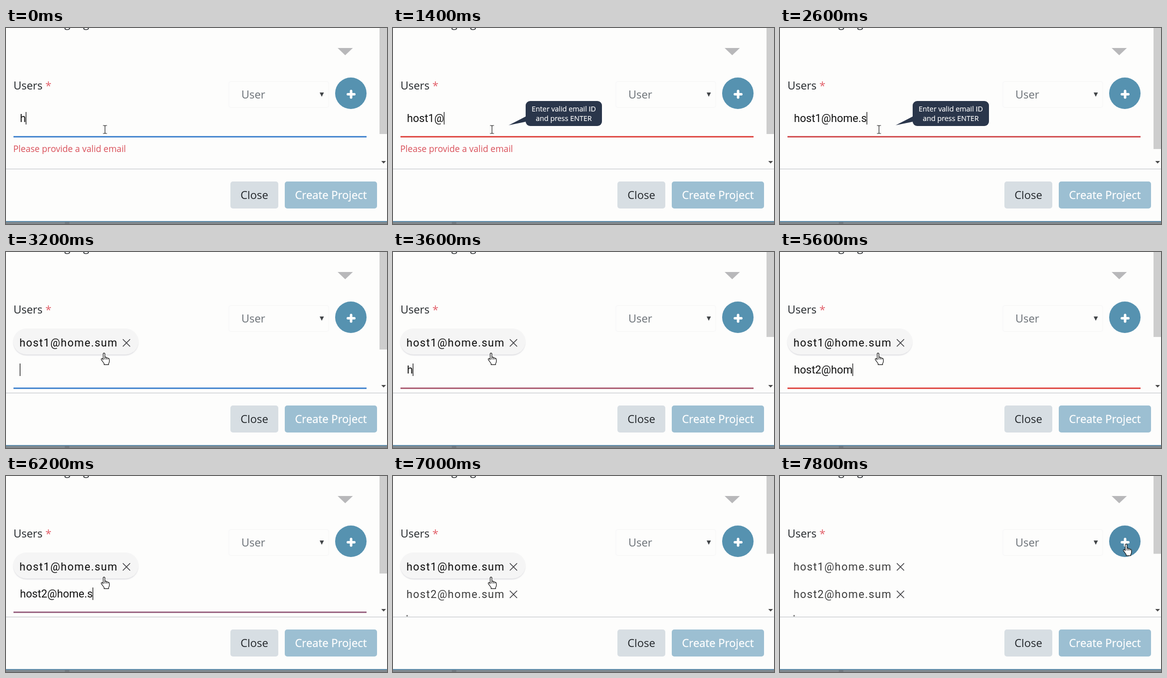
Recreate the animation shown at these times as an HTML page. Size 764x392 px, loop 8000 ms.

```html
<!DOCTYPE html>
<html lang="en">
<head>
<meta charset="utf-8">
<title>Add users</title>
<style>
  html, body { margin: 0; width: 100%; height: 100%; overflow: hidden; background: #fdfdfc; }
  svg { display: block; width: 100vw; height: 100vh; }
  text { font: 22px "Open Sans", sans-serif; fill: #212529; }
  .mono { font: 21.7px Roboto, sans-serif; fill: #111; }
  .chip .mono { letter-spacing: 1.45px; fill: #3c3c3c; }
  .chip.hover .mono { fill: #0c0c0c; }
  .chip .pill { visibility: hidden; }
  .chip.hover .pill { visibility: inherit; }
  .error { font-size: 17.6px; fill: #d9505a; }
  .tip text { font-size: 14.3px; fill: #fff; stroke: #fff; stroke-width: .2px; text-anchor: middle; }
  .button text { text-anchor: middle; }
</style>
</head>
<body>
<svg viewBox="0 0 764 392">
  <defs>
    <filter id="soft" x="-10%" y="-30%" width="120%" height="160%">
      <feGaussianBlur stdDeviation="1.3"/>
    </filter>
    <clipPath id="panel"><rect width="764" height="281"/></clipPath>
  </defs>
  <rect width="764" height="392" fill="#fdfdfc"/>

  <g clip-path="url(#panel)">
    <text x="79.8" y="-1">Language</text>
    <path d="M665 40H695.5L680.2 54.5Z" fill="#b8b8ba"/>
    <text x="15" y="123">Users <tspan fill="#e2606a">*</tspan></text>

    <rect x="447" y="107" width="200" height="52" rx="4" fill="none" stroke="#f7f7f8" stroke-width="1.5"/>
    <text x="472" y="141" style="fill:#696f75">User</text>
    <path d="M629 129H637.5L633.2 137.5Z" fill="#424548"/>

    <circle id="add" cx="691.5" cy="130.5" r="31.5"/>
    <path d="M692 126V139M685.5 132.500H698.500" stroke="#fff" stroke-width="5" stroke-linecap="round"/>

    <g class="chip" id="chip1"></g>
    <g class="chip" id="chip2" transform="translate(0 55)"></g>

    <g id="field">
      <text id="typed" class="mono" x="28" y="188"></text>
      <rect id="caret" y="168" width="1.3" height="25" fill="#111"/>
      <rect id="line" x="15" y="216" width="708" height="3"/>
      <text id="error" class="error" x="14.5" y="248">Please provide a valid email</text>
    </g>

    <rect id="thumb" x="749" width="15" fill="#cdcdcd"/>
    <path d="M752.5 266H762L757.200 271Z" fill="#4a4a4a"/>
  </g>

  <rect y="281" width="764" height="2" fill="#dadddf"/>
  <g class="button">
    <rect x="450" y="307" width="96" height="54" rx="5" fill="#d7dee3"/>
    <text x="498" y="342">Close</text>
    <rect x="559" y="307" width="185" height="54" rx="5" fill="#9cbfd2"/>
    <text x="651.5" y="342" style="fill:#fff;stroke:#fff;stroke-width:.3px">Create Project</text>
  </g>
  <rect y="386" width="764" height="2" fill="#5f8dac"/>
  <rect y="388" width="764" height="4" fill="#82898e"/>
  <rect x="118" y="388" width="9" height="4" fill="#72787d"/>

  <g id="tip" class="tip">
    <path d="M268 176L232 194.5L268 187Z" fill="#2a364b"/>
    <rect x="266" y="146" width="153" height="50" rx="9" fill="#2a364b"/>
    <text x="342.5" y="167">Enter valid email ID</text>
    <text x="342.5" y="186">and press ENTER</text>
  </g>

  <g id="mouse">
    <path id="beam" d="M-2-7H1L2-6L3-7H6M2-6V8M-2 9H1L2 8L3 9H6" fill="none" stroke="#222" stroke-width="1.2"/>
    <path id="hand" d="M-1.6 1.2Q0-.8 1.8 1.2V8.6Q4 7.6 5 9.4Q7.4 8.8 8 10.6Q10.8 10 10.8 13V17Q10.8 19 9.2 21V23.4H.2V21L-5.2 13.6Q-6.2 11-3.6 11L-1.6 13ZM1.8 8.6V13M5 9.4V13M8 10.6V13" fill="#fff" stroke="#111" stroke-width="1.2" stroke-linejoin="round"/>
    <path id="arrow" d="M0 0V18L4.2 14L7 20.5L9.8 19.3L7 13H12.5Z" fill="#fff" stroke="#111" stroke-width="1.2"/>
  </g>
</svg>
<script>
const LOOP = 8000, STEP = 200, ROW = 55, FADE = 150;
const el = id => document.getElementById(id);
const clamp = v => Math.min(1, Math.max(0, v));
const mix = (a, b, p) => a + (b - a) * p;
const show = (node, on) => node.setAttribute("visibility", on ? "visible" : "hidden");

// Moments of the first letter, the @ sign and the Enter key
const entries = [
  { mail: "host1@home.sum", start: 0, sign: 1400, enter: 3180 },
  { mail: "host2@home.sum", start: 3500, sign: 4800, enter: 6800 }
];

for (const entry of entries) {
  const { mail, start, sign, enter } = entry;
  const name = mail.indexOf("@"), domain = mail.length - name - 1;
  const beat = (enter - sign) / (domain + 1);
  // The address counts as valid from the first letter after the dot
  entry.valid = sign + beat * (mail.indexOf(".") + 1 - name);
  entry.letters = t => {
    if (t < start) return 0;
    if (t < sign) return 1 + Math.floor((t - start) / (sign - start) * name);
    return Math.min(mail.length, name + 1 + Math.floor((t - sign) / beat));
  };
}

entries.forEach(({ mail }, i) => {
  el("chip" + (i + 1)).innerHTML = `
    <g class="pill">
      <rect x="15" y="155.500" width="250" height="51" rx="25.5" fill="#d8d8dd" filter="url(#soft)"/>
      <rect x="14.5" y="153" width="251" height="52" rx="26" fill="#f5f5f5"/>
    </g>
    <text class="mono" x="26.9" y="189">${mail}</text>
    <path d="M234.300 174.500L248.800 189M248.800 174.500L234.300 189" stroke="#3e3e42" stroke-width="1.7"/>`;
});

function drawField(t, chips) {
  const entry = entries[chips];
  const count = entry ? entry.letters(t) : 0;
  const invalid = count > 0 && t < entry.valid;
  const red = entry ? clamp((t - entry.start) / FADE) - clamp((t - entry.valid) / FADE) : 0;
  const colour = [mix(74, 224, red), mix(137, 79, red), mix(208, 74, red)].map(Math.round);

  el("field").setAttribute("transform", `translate(0 ${chips * ROW})`);
  el("typed").textContent = entry ? entry.mail.slice(0, count) : "";
  el("caret").setAttribute("x", 27.6 + (count && el("typed").getComputedTextLength()));
  el("line").setAttribute("fill", `rgb(${colour})`);
  show(el("error"), invalid);

  // The thumb shrinks as the scrolled content grows
  const content = 578 + chips * ROW + (invalid ? 34 : 0);
  el("thumb").setAttribute("height", 312743 / content - 299);
}

function drawPointer(t, chips) {
  const p = clamp((t - 7000) / 600), ease = p * p * (3 - 2 * p);
  const x = mix(196.5, 694, ease), y = mix(202, 136, ease);
  const onAdd = Math.hypot(x - 691.5, y - 130.5) < 31.5;
  const onChip = chips > 0 && x < 266;
  const kind = onAdd || onChip ? "hand" : chips ? "arrow" : "beam";

  el("mouse").setAttribute("transform", `translate(${x} ${y})`);
  for (const id of ["beam", "hand", "arrow"]) show(el(id), id === kind);
  el("add").setAttribute("fill", onAdd ? "#508baa" : "#5692b0");
  el("chip1").classList.toggle("hover", onChip);
}

function draw(now) {
  const t = Math.floor(now % LOOP / STEP) * STEP;
  const chips = entries.filter(entry => t >= entry.enter).length;
  entries.forEach((_, i) => show(el("chip" + (i + 1)), chips > i));
  show(el("tip"), t >= 600 && chips === 0);
  drawField(t, chips);
  drawPointer(t, chips);
}

const start = performance.now();
function tick() {
  draw(performance.now() - start);
  requestAnimationFrame(tick);
}
tick();
</script>
</body>
</html>
```
